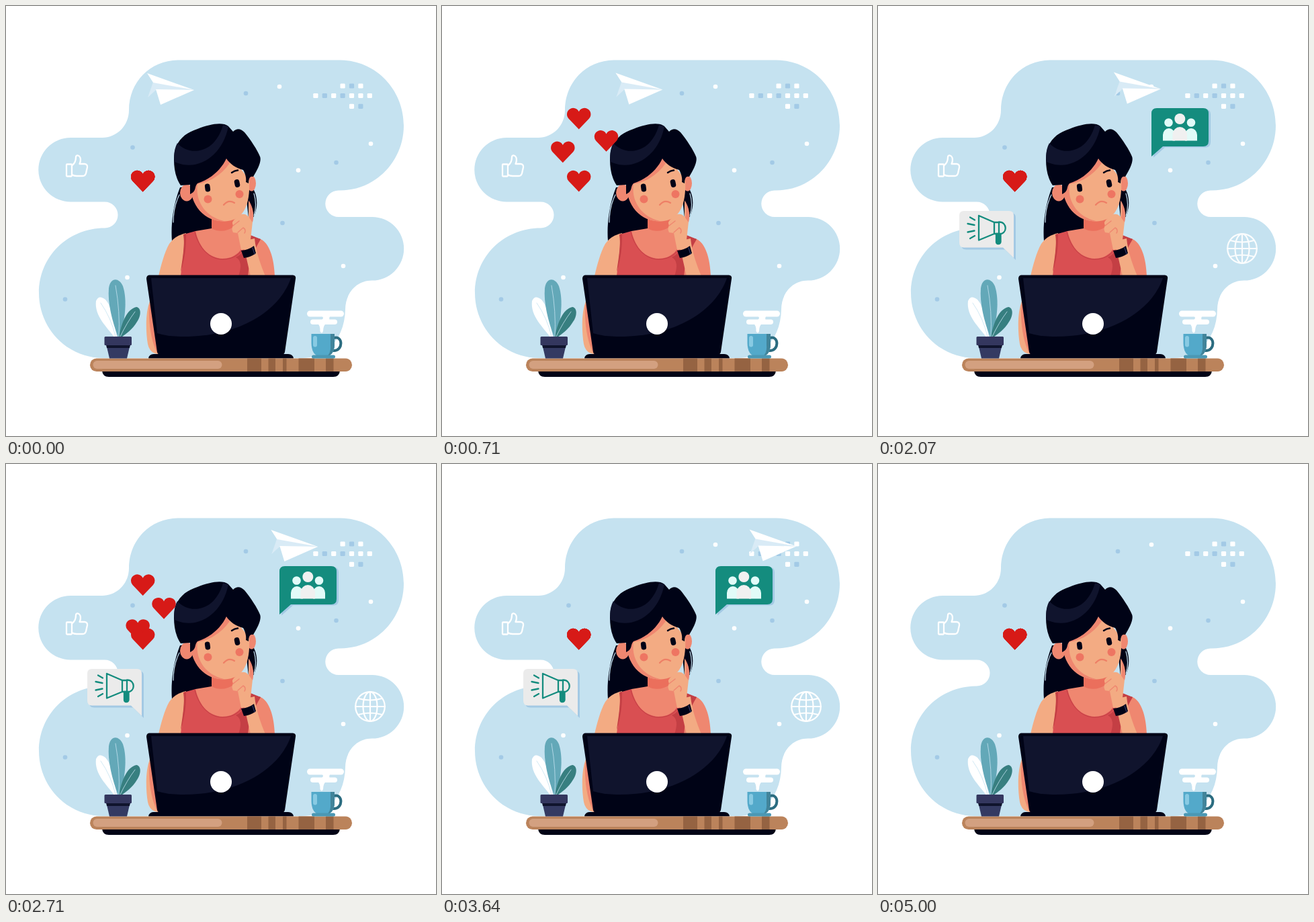
These frames come from a looping animation (640 px wide and 640 px high, 6000 ms). An HTML page:

```html
<!DOCTYPE html>
<html lang="en">
<head>
<meta charset="utf-8">
<title>Thinking at the desk</title>
<style>
  html, body { margin: 0; width: 100%; height: 100%; overflow: hidden; background: #fff; }
  svg { display: block; width: 100%; height: 100%; }
  .line { fill: none; stroke-linecap: round; stroke-linejoin: round; }
  .ink { fill: #000316; }
  .navy { fill: #10142d; }
  .skin { fill: #f3ab83; }
  .blush { fill: #ef8770; }
</style>
</head>
<body>
<svg viewBox="0 0 640 640">
  <defs>
    <path id="heart" fill="#d71a17" d="M0 16.500L-15.300 .4A9.300 9.300 0 1 1 0-9.800A9.300 9.300 0 1 1 15.300 .4Z"/>
    <path id="speech" d="M415 152H484Q492 152 492 160V201Q492 209 484 209H424L407 224V160Q407 152 415 152Z"/>
    <path id="note" d="M128 305H195Q202 305 202 312V375L186 359.500H128Q121 359.500 121 352V312Q121 305 128 305Z"/>
  </defs>

  <path fill="#c5e2f0" d="M257 80.500H497C550 80.500 592 124 592 178C592 231 550 274.500 497 274.500H495A19.750 19.750 0 0 0 495 314H545A47.250 47.250 0 0 1 545 408.500C521 408.500 505 428 505 452C504 492 480 524 440 524H145C91 524 49 480 49 427C49 373 92 330.500 147 330.500A19.500 19.500 0 0 0 147 291.500H96A47.500 47.500 0 0 1 96 196H143C165 196 183 178 183 155C183 113 215 80.500 257 80.500Z"/>
  <g id="dots"></g>

  <g class="line" stroke="#fff" stroke-width="2.300">
    <rect x="90" y="235.500" width="8" height="18" rx="1"/>
    <path d="M98 237.500C103 234 104 230 104 225Q104 222 107 222.500C112 224 111.500 231 109.500 235H117Q121.500 235.500 121 240L119 249Q118 253 114 253H105Q101 253 98 251"/>
  </g>
  <g id="globe" class="line" stroke="#fff" stroke-width="2.200">
    <circle cx="542" cy="361" r="21.800"/>
    <ellipse cx="542" cy="361" rx="10.500" ry="21.800"/>
    <path d="M542 339V383M520 361H564M524.500 349Q542 354 559.500 349M524.500 373Q542 368 559.500 373"/>
  </g>

  <g id="plane">
    <path fill="#d9ebf6" d="M219 113L280 125L223 125L211 136Z"/>
    <path fill="#fff" d="M210 100L280 125L219 114ZM223 124L280 125L230 147Z"/>
  </g>

  <g id="group">
    <use href="#speech" x="3" y="1.500" fill="#a3c9e4"/>
    <use href="#speech" fill="#148c7e"/>
    <g fill="#e1fbf8">
      <circle cx="432.500" cy="173.500" r="6.300"/><circle cx="466" cy="173.500" r="6.300"/>
      <path d="M424 200.500V192A9 10 0 0 1 442 192V200.500ZM457 200.500V192A9 10 0 0 1 475 192V200.500Z"/>
    </g>
    <path fill="#f0f0f0" d="M438.500 200.500V190A10.800 11 0 0 1 460 190V200.500Z"/>
    <circle cx="449.300" cy="168" r="8" fill="#f0f0f0"/>
  </g>

  <g id="mega">
    <use href="#note" x="3" y="3" fill="#a3c9e4"/>
    <use href="#note" fill="#ebebeb"/>
    <g class="line" stroke="#148c7e" stroke-width="2.300">
      <path d="M150 312V348.500L173 339V322ZM173 322H180V339H173M180 321.500C193 321 193 340 180 339.500M137 314.500L144 318.500M133.500 324L143.500 326M133.500 336.500L143.500 334.500M137 346L144 342"/>
      <path fill="#148c7e" d="M176 339H182.500V351Q182 354 179 354Q176 354 176 351Z"/>
    </g>
  </g>

  <!-- woman -->
  <path class="ink" d="M259 270C249 295 245 325 247 350L312 332V265ZM355 262L369 274C376 288 375 308 362 324Z"/>
  <path class="line" stroke="#c5e2f0" stroke-width="1.200" d="M258 281C250 297 249 310 249 322M369 279C373 292 372 302 369 312"/>
  <path class="skin" d="M268 338C255 341 248 347 243 354C236 366 231 385 227 402H264ZM215 437C207 455 208 485 211 503Q214 517 226 518L230 500Z"/>
  <path class="blush" d="M213 445C212 474 216 500 226 518L230 516L220 440Z"/>
  <path class="blush" d="M306 312H347L352 340L379 347C392 353 399 375 400 402H350L268 350L282 335L306 331Z"/>
  <path fill="#d94f52" d="M264 340L282 335C288 361 303 375 322 376C341 376 352 365 360 342L379 347C368 365 361 384 360 402H260C262 385 267 357 264 340Z"/>
  <path fill="#c43f44" d="M364 341L379 347C368 365 361 384 360 402H346C351 388 350 378 342 374C354 369 361 355 364 341ZM264 340L268 339C268 359 267 373 260 396C262 380 267 354 264 340Z"/>
  <path class="line" stroke="#c43f44" stroke-width="1" d="M281 336C287 362 304 377 322 377C334 377 343 373 349 366"/>
  <path fill="#eb6f5c" d="M306 314H340V328Q322 340 306 331Z"/>
  <ellipse class="blush" cx="269" cy="278" rx="10" ry="12.500"/>
  <ellipse class="blush" cx="365.500" cy="264" rx="6.500" ry="11.500"/>
  <path class="skin" d="M274 260C275 299 296 321 326 320.500C352 319 364 299 362 258L335 225H315Z"/>
  <path class="blush" d="M328 226L333 234C321 251 304 262 285 265C281 294 301 317 328 320.500C297 322 274 299 274 262Z"/>
  <rect class="ink" x="296.200" y="264.500" width="7.600" height="12" rx="3.800" transform="rotate(-8 300 270.500)"/>
  <rect class="ink" x="340.200" y="258" width="7.600" height="12" rx="3.800" transform="rotate(-12 344 264)"/>
  <path class="line" stroke="#000316" stroke-width="2.500" d="M336 248Q340 245 345 244.500"/>
  <g fill="#ee7562"><circle cx="300.500" cy="287.500" r="6"/><circle cx="347.500" cy="280" r="6"/></g>
  <path class="line" stroke="#ee7f66" stroke-width="2.200" d="M324 296Q331 287.500 340 293"/>
  <path class="ink" d="M274 280V266L260 267C253 257 250 243 250 229C250 204 263 190 285 183C303 176 322 172 331 179L338 187Q346 179 355 188C364 199 374 214 378 224C381 231 374 244 368 254Q361 252 361 264L357 262C358 256 356 249 353 244C342 241 333 235 328 227C320 244 304 258 285 264C280 269 284 276 274 280Z"/>
  <path class="navy" d="M255 204C272 224 311 221 323 177L331 179C323 222 286 248 251 232C249 222 251 211 255 204Z"/>
  <path class="skin" d="M352 350L370 346C372 366 379 385 386 402H364Z"/>
  <path class="skin" d="M361 290C367 299 369 310 367 321L364 348Q366 357 364 362L350 363L345 338L338 337Q335 331 338 327Q335 321 341 317C347 309 356 307 361 314Z"/>
  <path class="blush" d="M361 289C367 298 370 309 367 322L362 315Q364 301 361 289Z"/>
  <path class="line" stroke="#ef8770" stroke-width="1.500" d="M338 327L347 320M345 337L353 330M353 330Q358 333 355 338"/>
  <path class="ink" d="M350 364Q361 363 369 357L372 368Q364 374 354 375Z"/>
  <path class="line" stroke="#2c3158" stroke-width="1.500" d="M367 360L370 369"/>

  <!-- laptop and desk -->
  <path class="ink" d="M213 400.500H427Q432 401 431 406L415 515Q414 519 410 519H230Q226 519 225 515L209 406Q209 401 213 400.500ZM212 524.500Q213 518 220 518H420Q427 518 428 524.500Z"/>
  <path class="navy" d="M216 405H424C407 455 345 492 265 492Q240 492 225 487Z"/>
  <circle cx="320" cy="473" r="16" fill="#fff"/>
  <path class="ink" d="M143 543H497Q496 552 487 552H153Q144 552 143 543Z"/>
  <rect x="125" y="524.500" width="390" height="19.500" rx="9.750" fill="#bb835b"/>
  <rect x="129.500" y="528" width="192" height="12" rx="6" fill="#d3a080"/>
  <path fill="#956342" d="M359 524.500H380V544H359ZM390.500 524.500H401V544H390.500ZM412 524.500H417.500V544H412ZM435.500 524.500H459V544H435.500ZM476 524.500H487.500V544H476Z"/>

  <!-- plant -->
  <path fill="#fff" d="M161 493C152 479 131 462 134 439Q138 429 148 437C159 449 161 474 165 493Z"/>
  <path fill="#63a8b8" d="M167 493C158 470 151 441 153 420C155 404 168 403 174 417C181 438 177 470 169 493Z"/>
  <path fill="#377f80" d="M168 493C172 471 180 451 194 448C202 449 201 462 195 470C188 482 178 488 172 493Z"/>
  <path class="line" stroke="#c5e2f0" stroke-width=".8" d="M141 442Q157 465 163 492M163 416Q170 455 168 492M192 455Q180 471 170 492"/>
  <path fill="#343a62" d="M149 503H185L180 524.500H154Z"/>
  <path class="navy" d="M149 504H185L184 509H150Z"/>
  <rect x="146.500" y="492" width="40.500" height="13" rx="1.500" fill="#34375f"/>

  <!-- cup -->
  <g fill="#fff">
    <rect x="448" y="453.500" width="55" height="9" rx="4.500"/>
    <rect x="453" y="466.500" width="40" height="7.500" rx="3.750"/>
    <path d="M469 461H483Q480 464 482 468H469Q475 464 469 461ZM464 473H476Q472 476 472 484Q470 489 467.500 484Q468 476 464 473Z"/>
  </g>
  <path class="line" stroke="#2b6c80" stroke-width="4" d="M488 494C502 490 502 514 487 513"/>
  <path fill="#53a9ca" d="M454.500 488H489V505Q488 520 478 521H465Q455 519 454.500 502Z"/>
  <path fill="#41849a" d="M483 488H489V505Q488 520 478 521Q484 516 483 505Z"/>
  <rect x="457" y="491" width="6" height="16.500" rx="3" fill="#88cae3"/>
  <rect x="455" y="519.500" width="35" height="5" rx="2.500" fill="#4b98b4"/>

  <use href="#heart" class="flying"/>
  <use href="#heart" class="flying"/>
  <use href="#heart" class="flying"/>
  <use href="#heart" x="203.700" y="260"/>
</svg>
<script>
const LOOP = 6000, END = 5000;
const $ = id => document.getElementById(id);
const clamp = v => Math.min(1, Math.max(0, v));
const ramp = (t, from, to) => clamp((t - from) / (to - from));
const smooth = (t, from, to) => { const s = ramp(t, from, to); return s * s * (3 - 2 * s); };

const mark = (tag, attrs) => {
  const el = document.createElementNS('http://www.w3.org/2000/svg', tag);
  for (const key in attrs) el.setAttribute(key, attrs[key]);
  $('dots').append(el);
};
const WHITE = '#fff', BLUE = '#a3cae6';
const dot = fill => ([cx, cy]) => mark('circle', { cx, cy, r: 3.3, fill });
[[407, 120], [435, 244.5], [543, 205], [502, 387], [180.5, 404]].forEach(dot(WHITE));
[[357, 130], [188.5, 210.5], [491.5, 233], [411.5, 323], [88, 436.5]].forEach(dot(BLUE));

// Rows of small squares: start column, y, colours
[[3, 119, 'wbw'], [0, 133.5, 'wbwbwww'], [4, 149.3, 'wb']].forEach(([col, y, tones]) =>
  [...tones].forEach((tone, i) => mark('rect', {
    x: 457.3 + (col + i) * 13.4, y: y - 3.6, width: 7.2, height: 7.2, rx: 1.4,
    fill: tone === 'w' ? WHITE : BLUE
  })));

// Each burst flies out, holds, and returns in reverse order
const BURSTS = [0, 2570, 4220], BURST = 900, FLIGHT = 174;
const PATHS = [
  { dx: 0, dy: -93, delay: 7 },
  { dx: 41, dy: -60, delay: 22 },
  { dx: -42, dy: -76, delay: 94 }
];
const hearts = [...document.querySelectorAll('.flying')];

function moveHearts(t) {
  const start = BURSTS.find(b => t >= b && t < b + BURST);
  const phase = t < END && start !== undefined ? t - start : 0;
  const out = Math.min(phase, BURST - phase);
  PATHS.forEach(({ dx, dy, delay }, i) => {
    const k = smooth(out, delay, delay + FLIGHT);
    hearts[i].setAttribute('transform', `translate(${203.7 + dx * k} ${260 + dy * k})`);
  });
}

// Bubbles swing and grow from the tip of their tail
function popBubble(id, x, y, swing, size) {
  $(id).setAttribute('transform',
    `translate(${x} ${y}) rotate(${swing * (1 - size)}) scale(${size}) translate(${-x} ${-y})`);
  $(id).style.visibility = size > 0 ? 'visible' : 'hidden';
}

function draw(t) {
  $('plane').setAttribute('transform', `translate(${t * 0.068} ${-t * 0.0007})`);
  $('plane').style.opacity = 1 - ramp(t, 4100, 4450);
  $('globe').style.opacity = ramp(t, 1700, 2100) - ramp(t, 3800, 4200);
  popBubble('group', 409, 225, 57, smooth(t, 950, 1390) - smooth(t, 4225, 4640));
  popBubble('mega', 204, 377, -57, smooth(t, 880, 1365) - smooth(t, 4560, 4985));
  moveHearts(t);
}

const begin = performance.now();
function tick() {
  draw((performance.now() - begin) % LOOP);
  requestAnimationFrame(tick);
}
draw(0);
requestAnimationFrame(tick);
</script>
</body>
</html>
```
